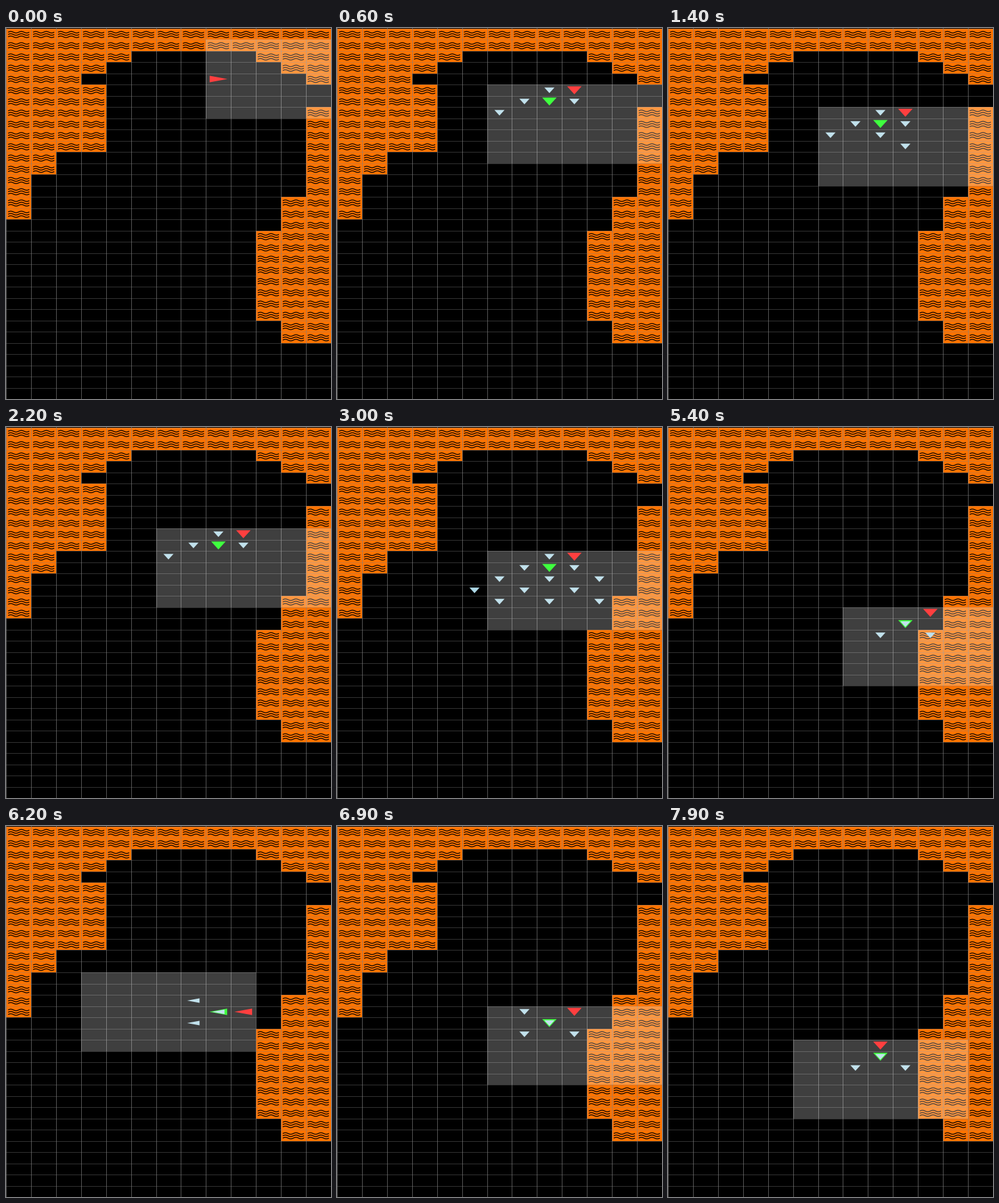
Write a matplotlib script that moves like this. It is 506x578 px and loops after 8000 ms.

```python
import numpy as np
import matplotlib.pyplot as plt
from matplotlib.animation import FuncAnimation
from matplotlib.collections import LineCollection, PolyCollection
from matplotlib.patches import Rectangle

W, H, DPI = 506, 578, 100
COLS, ROWS = 13, 33
CW, CH = 38.87, 17.5
X0, Y0 = 0.3, 0.75
FRAMES, INTERVAL = 80, 100

LAVA, RED, GREEN, PALE = "#ff7300", "#ff0000", "#00ff00", "#add8e6"

# Lava spans per column: (first row, row after the last)
SPANS = [
    [(0, 17)], [(0, 13)], [(0, 11)], [(0, 4), (5, 11)], [(0, 3)],
    [(0, 2)], [(0, 2)], [(0, 2)], [(0, 2)], [(0, 2)],
    [(0, 3), (18, 26)], [(0, 4), (15, 28)], [(0, 5), (7, 28)],
]

# Search cells as (side, ahead) offsets from an agent facing south
NEAR = [(-1, 0), (-2, 1), (0, 1), (-3, 2), (-1, 2)]
SHORT = NEAR + [(0, 3)]
WIDE = NEAR + [(1, 2), (-4, 3), (-2, 3), (0, 3), (-3, 4), (-1, 4), (1, 4)]
MID = NEAR + [(1, 2), (-2, 3), (2, 3)]
FORK = [(-1, 1), (-2, 2), (0, 2)]
SIDE = FORK + [(-2, 0)]
AHEAD = [(0, 1), (-1, 2), (1, 2)]
LEFT, FRONT = (-1, 1), (0, 1)

# Start frame, column, row, heading, goal offset, search cells
STEPS = [
    (0, 8, 4, "E", FRONT, AHEAD),
    (2, 9, 4, "E", FRONT, AHEAD),
    (3, 9, 4, "S", LEFT, SHORT),
    (5, 9, 5, "S", LEFT, SHORT),
    (10, 9, 6, "S", LEFT, SHORT),
    (12, 9, 7, "S", LEFT, SHORT),
    (18, 9, 8, "S", LEFT, MID),
    (21, 9, 9, "S", LEFT, MID),
    (24, 9, 10, "S", LEFT, WIDE),
    (27, 9, 11, "S", LEFT, WIDE),
    (34, 9, 12, "S", LEFT, WIDE),
    (38, 9, 13, "S", LEFT, MID),
    (43, 9, 14, "S", LEFT, MID),
    (46, 9, 15, "S", LEFT, FORK),
    (49, 10, 15, "S", LEFT, FORK),
    (51, 10, 16, "S", LEFT, FORK),
    (56, 10, 16, "W", FRONT, AHEAD),
    (61, 9, 16, "W", FRONT, AHEAD),
    (64, 9, 16, "S", LEFT, SIDE),
    (71, 8, 17, "S", FRONT, AHEAD),
    (75, 8, 18, "S", FRONT, AHEAD),
    (78, 8, 19, "S", FRONT, AHEAD),
]

CELLS_PER_FRAME = 4


def corner(col, row):
    return X0 + col * CW, Y0 + row * CH


def turn(side, ahead, heading):
    """Rotate a south-facing offset to the given heading."""
    if heading == "E":
        return ahead, -side
    if heading == "W":
        return -ahead, side
    return side, ahead


def arrow(col, row, heading, scale=1.0):
    """Triangle inside a cell, pointing along the heading."""
    x, y = corner(col + 0.5, row + 0.5)
    pts = [(-0.29, -0.35), (0.29, -0.35), (0, 0.36)]
    turned = [turn(a * scale, b * scale, heading) for a, b in pts]
    return [(x + dx * CW, y + dy * CH) for dx, dy in turned]


def view_box(col, row, heading):
    """Seven by seven cells in front of the agent."""
    if heading == "S":
        return corner(col - 3, row)
    if heading == "E":
        return corner(col, row - 3)
    return corner(col - 6, row - 3)


def cell_waves(col, row):
    x, y = corner(col, row)
    t = np.linspace(0, 1, 25)
    ripple = -1.2 * np.sin(4 * np.pi * t)
    return [np.column_stack([x + 3 + 33 * t, y + dy + ripple])
            for dy in (5.8, 9.4, 13.0)]


# The small margin keeps the pixel size from rounding down
fig = plt.figure(figsize=((W + 0.01) / DPI, (H + 0.01) / DPI), dpi=DPI,
                 facecolor="black")
ax = fig.add_axes([0, 0, 1, 1])
ax.set_xlim(0, W)
ax.set_ylim(H, 0)
ax.axis("off")

waves = []
for col, spans in enumerate(SPANS):
    for top, end in spans:
        ax.add_patch(Rectangle(corner(col, top), CW, (end - top) * CH,
                               fc=LAVA, lw=0, antialiased=False, zorder=1))
        for row in range(top, end):
            waves += cell_waves(col, row)
ax.add_collection(LineCollection(waves, colors="black", linewidths=0.9,
                                 zorder=2))

for col in range(COLS + 1):
    ax.axvline(corner(col, 0)[0], color="#808080", alpha=0.68, lw=0.72,
               snap=True, zorder=3)
for row in range(ROWS + 1):
    ax.axhline(corner(0, row)[1], color="#808080", alpha=0.4, lw=0.72,
               snap=True, zorder=3)

arrows = PolyCollection([], linewidths=0, zorder=4)
ax.add_collection(arrows)
view = Rectangle((0, 0), 7 * CW, 7 * CH, fc="white", alpha=0.25, lw=0,
                 antialiased=False, zorder=5)
ax.add_patch(view)


def update(frame):
    start, col, row, heading, goal, cells = [
        s for s in STEPS if s[0] <= frame][-1]
    view.set_xy(view_box(col, row, heading))

    shapes, colors = [arrow(col, row, heading)], [RED]

    def add(offset, color, scale):
        dc, dr = turn(*offset, heading)
        shapes.append(arrow(col + dc, row + dr, heading, scale))
        colors.append(color)

    if frame > start:
        add(goal, GREEN, 1.0)
        for cell in cells[:CELLS_PER_FRAME * (frame - start)]:
            add(cell, PALE, 0.7)
    arrows.set_verts(shapes)
    arrows.set_facecolor(colors)
    return arrows, view


anim = FuncAnimation(fig, update, frames=FRAMES, interval=INTERVAL,
                     repeat=True, repeat_delay=0, blit=False)
plt.show()
```
